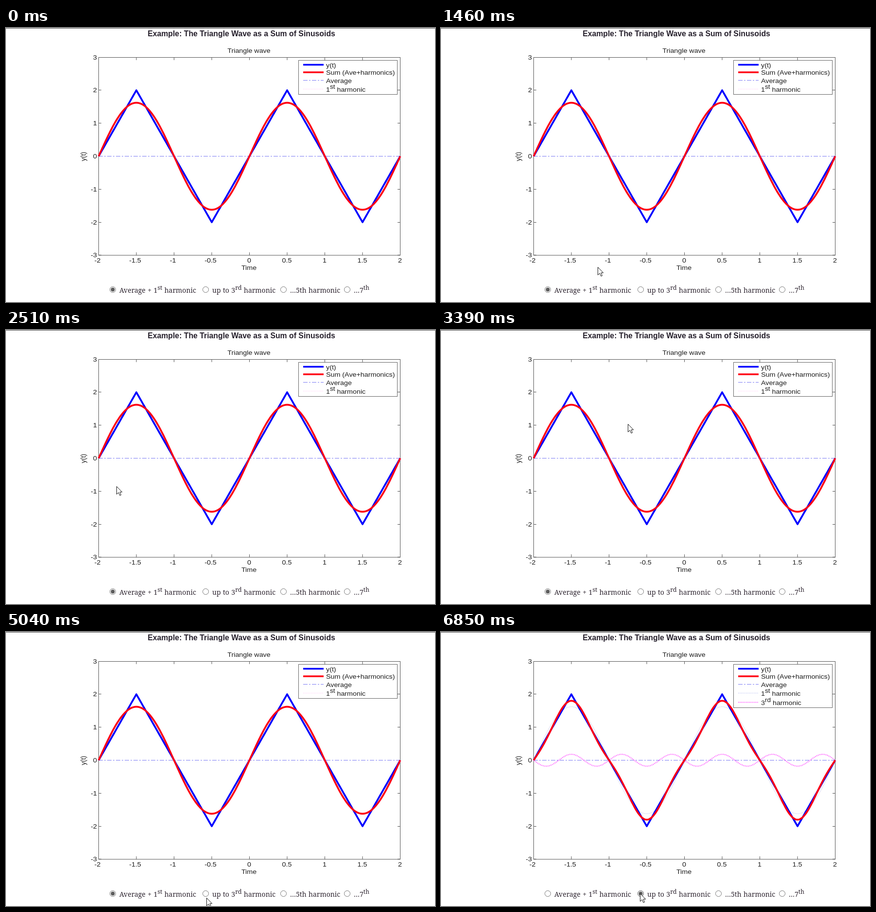
Recreate the animation shown at these times as an HTML page. Size 882 by 563 pixels, loop 8 s.

```html
<!DOCTYPE html>
<html lang="en">
<head>
<meta charset="utf-8">
<title>Triangle wave as a sum of sinusoids</title>
<style>
  html, body { margin: 0; width: 100%; height: 100%; overflow: hidden; background: #fff; }
  svg { display: block; width: 100%; height: 100%; }
  .heading { font: bold 15.8px "Liberation Sans", Arial, sans-serif; fill: #26202c; }
  .plot { font: 13px "Liberation Sans", Arial, sans-serif; fill: #1c1c1c; }
  .option { font: 14px "Noto Serif", serif; word-spacing: .8px; fill: #2e2530; }
  .axis { fill: none; stroke: #555; }
  .curve { fill: none; stroke-width: 3.7; stroke-linejoin: round; }
  .average { stroke: #7c7cf4; stroke-dasharray: 9 3 3 3; }
</style>
</head>
<body>
<svg id="stage" viewBox="0 0 882 563"></svg>
<script>
const stage = document.getElementById('stage');
const LOOP = 8000, STEP = 70;
const HOVER = 5590, PRESS = 6710, REDRAW = 6780;
const ASPECT = 1.1; // the whole plot is shown slightly wider than drawn

function add(tag, attrs = {}, content = '', parent = stage) {
  const node = document.createElementNS('http://www.w3.org/2000/svg', tag);
  for (const name in attrs) node.setAttribute(name, attrs[name]);
  node.innerHTML = content;
  parent.append(node);
  return node;
}
function label(x, y, content, anchor = 'start', parent = stage, turn = 0) {
  add('text', {
    class: 'plot', 'text-anchor': anchor,
    transform: `translate(${x} ${y}) scale(${ASPECT} 1) rotate(${turn})`
  }, content, parent);
}
const raised = (base, sup, rest = '') =>
  `${base}<tspan dy="-6" font-size="12.3">${sup}</tspan><tspan dy="6">${rest}</tspan>`;

const px = t => 500.5 + 155 * t;
const py = v => 263.5 - 67.8 * v;
function wave(fn) {
  const points = Array.from({ length: 401 }, (_, i) => {
    const t = i / 100 - 2;
    return `${px(t).toFixed(2)} ${py(fn(t)).toFixed(2)}`;
  });
  return 'M' + points.join('L');
}
const AMPLITUDE = 16 / Math.PI ** 2;
const first = t => AMPLITUDE * Math.sin(Math.PI * t);
const third = t => -AMPLITUDE / 9 * Math.sin(3 * Math.PI * t);
const sum = t => first(t) + third(t);
const triangle = t => 4 / Math.PI * Math.asin(Math.sin(Math.PI * t));

// Heading and axes
add('path', { d: 'M0 .5H882', class: 'axis' });
add('text', { class: 'heading', x: 484, y: 17, 'text-anchor': 'middle' },
  'Example: The Triangle Wave as a Sum of Sinusoids');
label(499.5, 51, 'Triangle wave', 'middle');
label(499.5, 497, 'Time', 'middle');
label(164, 264, 'y(t)', 'middle', stage, -90);
add('rect', { x: 190.5, y: 60.5, width: 620, height: 406.5, class: 'axis' });
for (let v = -3; v <= 3; v++) {
  const y = Math.floor(py(v)) + 0.5;
  add('path', { d: `M190 ${y}h6M811 ${y}h-6`, class: 'axis' });
  label(187, y + 4.5, v, 'end');
}
for (let t = -2; t <= 2; t += 0.5) {
  add('path', { d: `M${px(t)} 60v6M${px(t)} 467v-6`, class: 'axis' });
  label(px(t) - (t < 0 ? 2.5 : 0.5), 482, t, 'middle');
}

// Curves and legend for each choice
const solid = stroke => ({ class: 'curve', stroke });
const dotted = (stroke, width) => ({ fill: 'none', stroke, 'stroke-width': width, 'stroke-dasharray': '1.4 1.8' });
const blue = solid('#00f'), red = solid('#ff0014'), average = { class: 'average' };
const pink = dotted('#ffc4f4', 1), pale = dotted('#a9b2ee', 1), magenta = dotted('#ff4cff', 2.2);

function plot(total, extras, rows) {
  const group = add('g');
  add('path', { d: 'M190 263.5H810', ...average }, '', group);
  const curves = [...extras, [triangle, blue], [total, red]];
  curves.forEach(([fn, style]) => add('path', { d: wave(fn), ...style }, '', group));
  const bottom = rows.at(-1)[0] + 11;
  add('rect', { x: 601.5, y: 66.5, width: 203, height: bottom - 66.5, fill: '#fff', stroke: '#666' }, '', group);
  rows.forEach(([y, content, style]) => {
    add('path', { d: `M611 ${y}H653`, ...style }, '', group);
    label(658, y + 5, content, 'start', group);
  });
  return group;
}
const baseRows = [
  [75.5, 'y(t)', blue], [91, 'Sum (Ave+harmonics)', red], [107.5, 'Average', average]
];
const firstName = raised('1', 'st', ' harmonic');
const onePlot = plot(first, [], [...baseRows, [125.5, firstName, pink]]);
const threePlot = plot(sum, [[first, pale], [third, magenta]],
  [...baseRows, [125.5, firstName, pale], [144.5, raised('3', 'rd', ' harmonic'), magenta]]);

// Radio buttons
const radios = [
  [219.5, raised('Average + 1', 'st', ' harmonic')],
  [410.5, raised('up to 3', 'rd', ' harmonic')],
  [570.5, '…5th harmonic'],
  [701.5, raised('…7', 'th')]
].map(([cx, content]) => {
  add('text', { class: 'option', x: cx + 13.5, y: 544 }, content);
  return {
    ring: add('circle', { cx, cy: 537.5, r: 6, fill: '#fff' }),
    dot: add('circle', { cx, cy: 537.5, r: 4, fill: '#5c5c5c' })
  };
});

// Pointer: each move eases out along a curve to a rest point, optionally bent towards a control point
const cursor = add('path', {
  d: 'M.5 .5V16.5L4.3 13L7 19L9.5 18L7 12H11.7Z', fill: '#fff', stroke: '#111', 'stroke-linejoin': 'round'
});
const entry = [764, 557];
const moves = [
  { start: 440, steps: 3, to: [406, 478] },
  { start: 1170, steps: 12, to: [272, 512], bend: [348, 474] },
  { start: 2020, steps: 8, to: [227, 321], bend: [255, 560] },
  { start: 3110, steps: 12, to: [692, 161], bend: [127, 190] },
  { start: 3950, steps: 3, to: [764, 287] },
  { start: 4350, steps: 3, to: [386, 443], bend: [477, 345] },
  { start: 4690, steps: 6, to: [412, 546], bend: [293, 490] },
  { start: 5450, steps: 5, to: [409, 537] }
];
function pointerAt(time) {
  const index = moves.findLastIndex(move => move.start <= time);
  if (index < 0) return null;
  const { start, steps, to, bend } = moves[index];
  const from = index ? moves[index - 1].to : entry;
  const done = Math.min(1, (Math.floor((time - start) / STEP) + 1) / steps);
  const s = 1 - (1 - done) ** 2;
  return to.map((end, axis) => {
    const control = bend ? bend[axis] : (from[axis] + end) / 2;
    return Math.round(from[axis] * (1 - s) ** 2 + 2 * control * s * (1 - s) + end * s * s);
  });
}

const show = (node, visible) => node.setAttribute('visibility', visible ? 'visible' : 'hidden');
function draw(now) {
  const time = now % LOOP;
  const chosen = time < PRESS ? 0 : 1;
  radios.forEach(({ ring, dot }, i) => {
    ring.setAttribute('stroke', i === 1 && time >= HOVER ? '#4f4f4f' : '#767676');
    show(dot, i === chosen);
  });
  show(onePlot, time < REDRAW);
  show(threePlot, time >= REDRAW);
  const point = pointerAt(time);
  show(cursor, point);
  if (point) cursor.setAttribute('transform', `translate(${point})`);
}
const began = performance.now();
function tick() {
  draw(performance.now() - began);
  requestAnimationFrame(tick);
}
tick();
</script>
</body>
</html>
```
